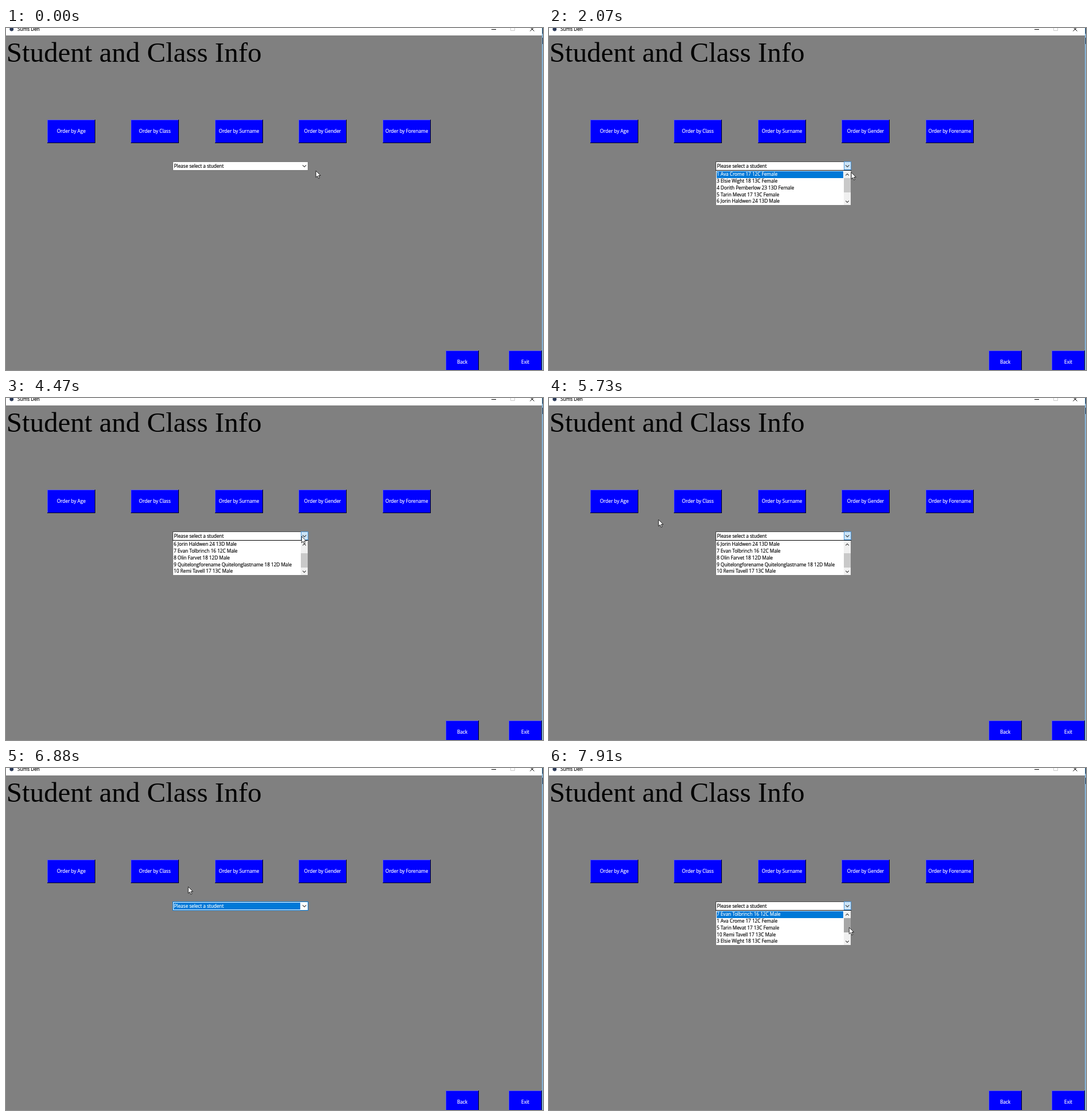
An HTML page that plays this animation: 938 px wide and 597 px high, repeating every 8000 ms.

```html
<!DOCTYPE html>
<html lang="en">
<head>
<meta charset="utf-8">
<title>Student and Class Info</title>
<style>
  html, body { margin: 0; width: 100%; height: 100%; overflow: hidden; background: #808080; }
  svg { display: block; width: 938px; height: 597px; }
  text {
    font: 8.2px "Open Sans", "Noto Sans", sans-serif;
    white-space: pre;
    color: #000; fill: currentColor; stroke: currentColor; stroke-width: .18px;
  }
  rect { shape-rendering: crispEdges; }
  .title { font: 49.1px "Liberation Serif", "Times New Roman", serif; stroke: none; }
  .line { fill: none; stroke: #000; }
  .chevron { fill: none; stroke: #404040; stroke-width: 1.1; }
  .button text { color: #fff; text-anchor: middle; }
  .pressed .face { fill: #f0f0f0; }
  .pressed text { color: #000; }
  .pressed .light { fill: #696969; }
  .pressed .dark { fill: #fff; }
</style>
</head>
<body>
<svg viewBox="0 0 938 597">
  <rect width="938" height="597" fill="#808080"/>
  <rect width="937" height="13" fill="#fff"/>
  <circle cx="9.8" cy="2" r="3.4" fill="#2c3a58"/>
  <text x="20" y="5">Sums Den</text>
  <path class="line" d="M848 2.5h8M915.5 -1.5l7 7m0 -7l-7 7"/>
  <path class="line" d="M881.5 -2v6.5h7V-2" style="stroke:#ccc"/>
  <rect x="936" width="2" height="597" fill="#86b4d8"/>
  <path d="M937 0h1v10h-1zM937 17h1v11h-1z" fill="#10243c"/>
  <text class="title" x=".7" y="59.3">Student and Class Info</text>
  <g id="buttons"></g>

  <g id="combo">
    <rect id="border" x="291" y="233" width="237" height="16"/>
    <rect x="292" y="234" width="235" height="14" fill="#fff"/>
    <rect id="mark" x="293" y="235" width="221" height="12" fill="#0078d7"/>
    <text id="value" x="293.4" y="243.7">Please select a student</text>
    <g id="lit">
      <rect x="515" y="233" width="13" height="15" fill="#4a94d6"/>
      <rect x="516" y="234" width="11" height="13" fill="#cce4f7"/>
    </g>
    <path class="chevron" d="M518 239.3l3.2 3.2 3.2 -3.2"/>
  </g>

  <g id="menu">
    <rect x="291" y="248" width="237" height="1"/>
    <rect x="292" y="249" width="235" height="60" fill="#fff"/>
    <rect id="pick" x="293" y="250" width="221" height="12" fill="#0078d7"/>
    <g id="rows"></g>
    <rect x="515" y="250" width="12" height="59" fill="#f0f0f0"/>
    <rect id="up" x="515" y="250" width="12" height="12"/>
    <rect id="down" x="515" y="297" width="12" height="12"/>
    <path id="upMark" class="chevron" d="M518.2 257.4l2.8 -2.8 2.8 2.8"/>
    <path id="downMark" class="chevron" d="M518.2 301.6l2.8 2.8 2.8 -2.8"/>
    <rect id="thumb" x="515" y="262" width="12" height="25"/>
  </g>

  <g id="pointer">
    <circle id="halo" cx="-.7" cy="0" r="9.2" fill="#e8e200" fill-opacity=".6"/>
    <path d="M.3 .3V11.8L3 9.3 4.8 13.6 6.7 12.8 4.9 8.6H8.5Z" fill="#fff" stroke="#000" stroke-width=".8"/>
  </g>
</svg>
<script>
const LOOP = 8000;
const TICK = 75;
const $ = id => document.getElementById(id);
const show = (id, on) => $(id).setAttribute('visibility', on ? 'inherit' : 'hidden');
const fill = (id, color) => { $(id).style.fill = color; };

function button(label, x, y, w) {
  const h = 41;
  return `<g class="button">
    <rect class="face" x="${x}" y="${y}" width="${w}" height="${h}" fill="#00f"/>
    <path class="light" d="M${x} ${y}h${w}v1h${1 - w}v${h - 1}h-1z" fill="#5a5aee"/>
    <path class="dark" d="M${x + w} ${y + h}h${-w}v-1h${w - 1}v${1 - h}h1z" fill="#000018"/>
    <text x="${x + w / 2}" y="${y + 23.2}">${label}</text></g>`;
}
$('buttons').innerHTML =
  ['Age', 'Class', 'Surname', 'Gender', 'Forename']
    .map((key, i) => button('Order by ' + key, Math.round(72 + i * 146.4), 160, 84)).join('') +
  button('Back', 768, 563, 58) + button('Exit', 878, 563, 58);
const ageButton = $('buttons').firstElementChild;

const students = [
  '1 Ava Crome 17 12C Female',
  '3 Elsie Wight 18 13C Female',
  '4 Dorith Pemberlow 23 13D Female',
  '5 Tarin Mevat 17 13C Female',
  '6 Jorin Haldwen 24 13D Male',
  '7 Evan Tolbrinch 16 12C Male',
  '8 Olin Farvet 18 12D Male',
  '9 Quitelongforename Quitelonglastname 18 12D Male',
  '10 Remi Tavell 17 13C Male'
];
const age = student => +student.split(' ')[3];
const byAge = [...students].sort((a, b) => age(a) - age(b));
$('rows').innerHTML = [0, 1, 2, 3, 4]
  .map(i => `<text x="293" y="${258.4 + i * 11.75}"></text>`).join('');
const rows = [...$('rows').children];

// Mouse presses, in ms
const press = { open: 950, page: 2790, line: 3070, close: 5810, sort: 6530, reopen: 7620 };
const lineHold = 670;
const held = (t, name) =>
  t >= press[name] && t < press[name] + (name === 'line' ? lineHold : TICK);

// Strokes of the mouse: first and last step, where it ends, sideways bow
const strokes = [
  { from: 230, to: 760, x: 526, y: 241 },
  { from: 2070, to: 2380, x: 526, y: 295, bow: 5 },
  { from: 3070, to: 3070, x: 526, y: 307 },
  { from: 4070, to: 4470, x: 516, y: 241, bow: 8 },
  { from: 4750, to: 4890, x: 447, y: 226 },
  { from: 5060, to: 5390, x: 316, y: 214 },
  { from: 5580, to: 5730, x: 191, y: 212 },
  { from: 6040, to: 6450, x: 149, y: 184 },
  { from: 6880, to: 6880, x: 318, y: 207 },
  { from: 6950, to: 7030, x: 466, y: 267 },
  { from: 7190, to: 7550, x: 504, y: 241 },
  { from: 7830, to: 7910, x: 524, y: 278 }
];

function pointerAt(t) {
  let x = 541, y = 249;
  for (const s of strokes) {
    if (t < s.from) break;
    const span = s.to - s.from;
    const last = Math.round(span / TICK);
    const step = t >= s.to ? last : Math.floor((t - s.from) / span * last);
    const f = (step + 1) / (last + 1);
    x += (s.x - x) * f + (s.bow || 0) * Math.sin(Math.PI * f) ** 2;
    y += (s.y - y) * f;
  }
  return [x, y];
}

function draw(t) {
  const [x, y] = pointerAt(t);
  const over = (left, top, w, h) => x >= left && x < left + w && y >= top && y < top + h;
  $('pointer').setAttribute('transform', `translate(${x.toFixed(1)} ${y.toFixed(1)})`);
  show('halo', Object.keys(press).some(name => held(t, name)));

  const open = t >= press.open && t < press.close || t >= press.reopen;
  const marked = t >= press.close && !open;
  const lit = open || over(291, 233, 237, 16);
  show('menu', open);
  show('mark', marked);
  show('lit', lit);
  $('value').style.color = marked ? '#fff' : '#000';
  fill('border', marked ? '#0078d7' : lit ? '#4a4a4a' : '#7a7a7a');
  ageButton.classList.toggle('pressed', held(t, 'sort'));

  const sorted = t >= press.sort;
  const offset = sorted || t < press.page ? 0 : t < press.line ? 3 : 4;
  const list = sorted ? byAge : students;
  rows.forEach((row, i) => {
    row.textContent = list[i + offset];
    row.style.color = i + offset === 0 ? '#fff' : '#000';
  });
  show('pick', open && offset === 0);

  const top = 262 + Math.round(offset * 2.3);
  const overUp = over(515, 250, 12, 12);
  const downHeld = held(t, 'line');
  fill('up', overUp ? '#dadada' : '#f0f0f0');
  fill('down', downHeld ? '#606060' : over(515, 297, 12, 12) ? '#dadada' : '#f0f0f0');
  $('upMark').style.stroke = overUp ? '#000' : '';
  $('downMark').style.stroke = downHeld ? '#fff' : '';
  $('thumb').setAttribute('y', top);
  fill('thumb', over(515, top, 12, 25) ? '#a6a6a6' : '#c9c9c9');
}

const start = performance.now();
function tick() {
  draw((performance.now() - start) % LOOP);
  requestAnimationFrame(tick);
}
tick();
</script>
</body>
</html>
```
